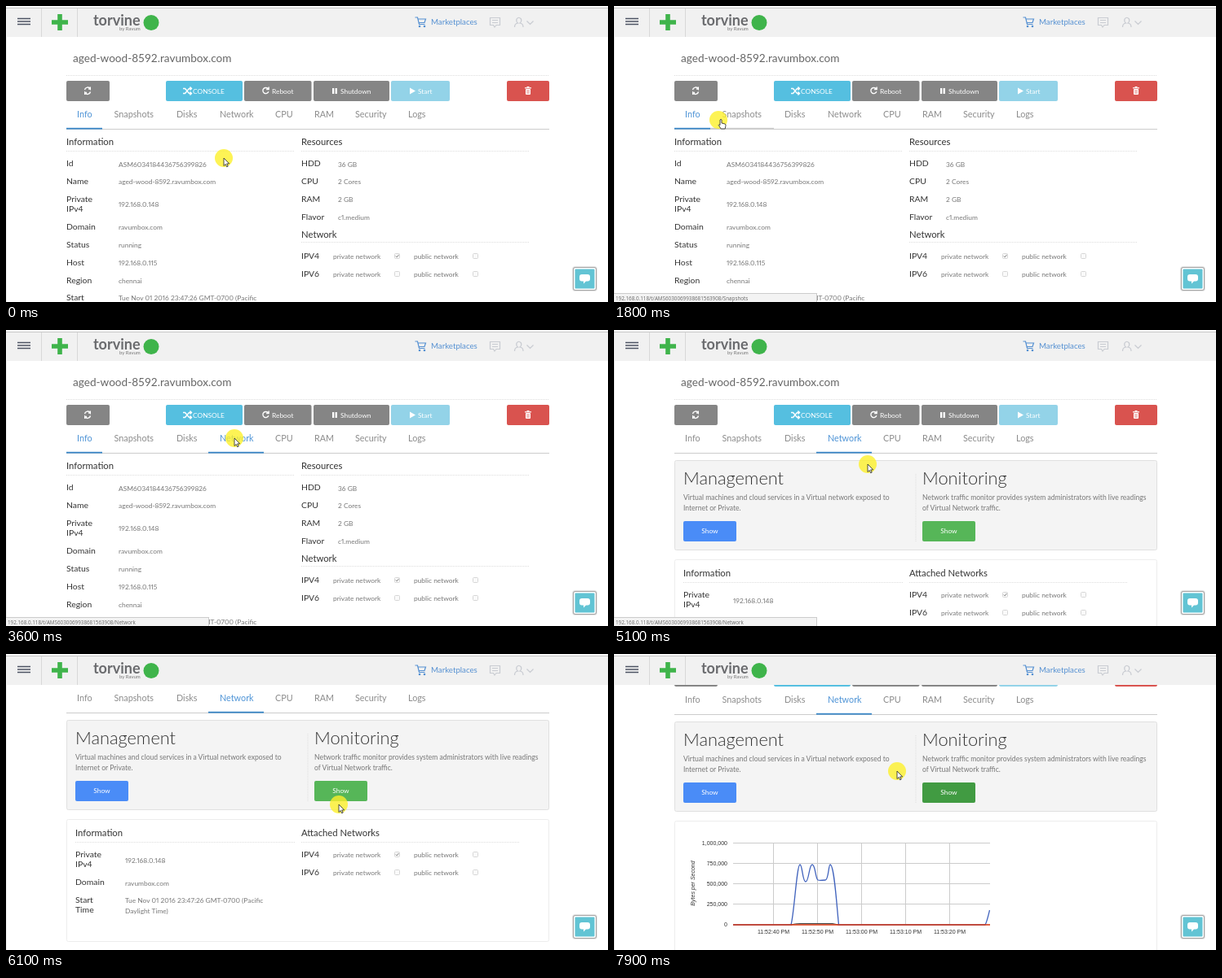
An HTML page that plays this animation: 738 px wide and 364 px high, repeating every 8 s.

```html
<!DOCTYPE html>
<html lang="en">
<head>
<meta charset="utf-8">
<title>Virtual machine dashboard</title>
<style>
html, body { margin: 0; width: 100%; height: 100%; overflow: hidden; background: #fff; }
svg { display: block; width: 738px; height: 364px; }
text { font-family: Lato, "Open Sans", sans-serif; white-space: pre; }
.title { font-size: 13.6px; fill: #666; }
.tab { font-size: 10.8px; fill: #8c8c8c; }
.head { font-size: 11.3px; fill: #333; }
.label { font-size: 10.4px; fill: #333; }
.value { font-size: 8.4px; fill: #777; font-variant-numeric: proportional-nums; }
.body { font-size: 8.56px; fill: #777; }
.big { font-size: 21.8px; font-weight: 300; fill: #333; }
.btn { font-size: 8.4px; fill: #fff; }
.brand { font-size: 18px; font-weight: 700; fill: #6a6b6e; }
.by { font-size: 6px; fill: #777; }
.market { font-size: 9.7px; fill: #5590d2; }
.url { font: 6.3px "Open Sans", sans-serif; fill: #666; }
.axis { font: 7px "Liberation Sans", Arial, sans-serif; fill: #333; }
.middle { text-anchor: middle; }
.end { text-anchor: end; }
.rule { stroke: #ddd; stroke-dasharray: 1 1; }
.white { fill: none; stroke: #fff; stroke-width: 1.4; }
.gray { fill: none; stroke: #c9ccd2; stroke-width: 1.2; }
</style>
</head>
<body>
<svg id="stage" viewBox="0 0 738 364"></svg>
<script>
const LOOP = 8000;
const HOST = 'aged-wood-8592.ravumbox.com';
const BLUE = '#3a88c8';
const TABS = [
  ['Info', 74, 118, 87], ['Snapshots', 118, 196, 132.5], ['Disks', 196, 248, 209],
  ['Network', 248, 316, 262], ['CPU', 316, 364, 330], ['RAM', 364, 414, 378],
  ['Security', 414, 479, 428], ['Logs', 479, 530, 493]
];

const text = (x, y, string, cls, extra = '') =>
  `<text x="${x}" y="${y}" class="${cls}" ${extra}>${string}</text>`;
const rect = (x, y, w, h, fill, extra = '') =>
  `<rect x="${x}" y="${y}" width="${w}" height="${h}" fill="${fill}" ${extra}/>`;
const path = (d, extra = '') => `<path d="${d}" ${extra}/>`;
const group = (id, content) => `<g id="${id}">${content}</g>`;
const rule = (x, y, w) => path(`M${x} ${y + .5}h${w}`, 'class="rule"');
const rows = (x, cls, list) => list.map(([y, s]) => text(x, y, s, cls)).join('');

function checkbox(x, y, checked) {
  return rect(x + .5, y + .5, 6, 6, '#fafafa', 'stroke="#d6d6d6" rx="1"') +
    (checked ? path(`M${x + 1.8} ${y + 3.5}l1.4 1.5 2.3-3.2`, 'fill="none" stroke="#888"') : '');
}

function networkFlags(y) {
  return [0, 22].map((dy, i) =>
    text(362, y + dy, i ? 'IPV6' : 'IPV4', 'label') +
    text(401, y + dy, 'private network', 'value') + checkbox(476, y + dy - 7, !i) +
    text(500, y + dy, 'public network', 'value') + checkbox(572, y + dy - 7)).join('');
}

function toolbar() {
  const button = (x, w, fill) => rect(x, 92, w, 25, fill, 'rx="2"');
  const turn = x => path(`M${x + 3} 102a3.6 3.6 0 1 0 .4 3.3M${x + 3.6} 99.5v3h-3`, 'class="white"');
  return button(74, 53, '#858585') + button(196, 94, '#55bfe0') + button(292, 82.5, '#858585') +
    button(377, 93, '#858585') + button(472, 72, '#93d3e8') + button(614, 52, '#d9534f') +
    path('M96.5 103a3.7 3.7 0 0 1 6.8-1.2v-2.3M103.5 105.5a3.7 3.7 0 0 1-6.8 1.2v2.3M101 102h3M96 106.5h3', 'class="white"') +
    path('M217 101.5h2.5l5 6h3M217 107.5h2.5l5-6h3M225.5 99.5l2 2-2 2M225.5 105.5l2 2-2 2', 'class="white"') +
    text(229, 108, 'CONSOLE', 'btn') + turn(318.5) + text(326, 108, 'Reboot', 'btn') +
    rect(400, 101, 2.3, 7, '#fff') + rect(403.6, 101, 2.3, 7, '#fff') + text(410, 108, 'Shutdown', 'btn') +
    path('M495 100.5v8l7-4z', 'fill="#fff"') + text(505, 108, 'Start', 'btn') +
    rect(637, 102, 6, 7, '#fff', 'rx="1"') + rect(636, 100.2, 8, 1.2, '#fff') + rect(638.5, 99, 3, 1, '#fff') +
    path('M639 103v5M641 103v5', 'stroke="#d9534f" stroke-width=".7"');
}

const tabs = TABS.map(([name, left, right, x], i) =>
  text(x, 137, name, 'tab', `id="tab${i}"`) +
  rect(left, 149.8, right - left, 1.8, BLUE, `id="line${i}"`)).join('');

const infoView = group('infoView',
  text(74, 171, 'Information', 'head') + rule(74, 178, 280) +
  rows(74, 'label', [[197, 'Id'], [219, 'Name'], [241, 'Private'], [253, 'IPv4'], [275, 'Domain'],
    [297, 'Status'], [319, 'Host'], [341, 'Region'], [362, 'Start']]) +
  rows(138, 'value', [[197.5, 'ASM6034184436756399826'], [219, HOST], [247, '192.168.0.148'],
    [275, 'ravumbox.com'], [297, 'running'], [319, '192.168.0.115'], [341, 'chennai'],
    [362, 'Tue Nov 01 2016 23:47:26 GMT-0700 (Pacific']]) +
  text(362, 171, 'Resources', 'head') + rule(362, 178, 280) +
  rows(362, 'label', [[197, 'HDD'], [219, 'CPU'], [241, 'RAM'], [263, 'Flavor']]) +
  rows(407, 'value', [[197.5, '36 GB'], [219, '2 Cores'], [241, '2 GB'], [263, 'c1.medium']]) +
  text(362, 285, 'Network', 'head') + rule(362, 290, 280) + networkFlags(311));

function panel(x, title, lines, color, id) {
  return text(x, 190, title, 'big') + rows(x, 'body', [[209, lines[0]], [222, lines[1]]]) +
    rect(x, 235, 65, 25, color, `id="${id}" rx="2"`) + text(x + 32.5, 250, 'Show', 'btn middle');
}

const detailCard = group('details',
  text(85, 303, 'Information', 'head') + rule(85, 310, 269) +
  rows(85, 'label', [[329, 'Private'], [341, 'IPv4'], [363, 'Domain'], [385, 'Start'], [397, 'Time']]) +
  rows(146, 'value', [[336, '192.168.0.148'], [364, 'ravumbox.com'],
    [385, 'Tue Nov 01 2016 23:47:26 GMT-0700 (Pacific'], [398, 'Daylight Time)']]) +
  text(362, 303, 'Attached Networks', 'head') + rule(362, 310, 268) + networkFlags(329));

function trafficChart() {
  let out = '';
  ['1,000,000', '750,000', '500,000', '250,000', '0'].forEach((s, i) => {
    const y = 309.5 + i * 25;
    out += path(`M146 ${y}H461`, 'stroke="#ccc"') + text(139, y + 2.4, s, 'axis end');
  });
  [40, 50, 0, 10, 20].forEach((sec, i) => {
    const x = 195.5 + i * 54;
    out += path(`M${x} 309.5v100`, 'stroke="#ccc"') +
      text(x, 421, `11:${i < 2 ? 52 : 53}:${String(sec).padStart(2, '0')} PM`, 'axis middle');
  });
  return group('chart', out +
    text(0, 0, 'Bytes per Second', 'axis middle', 'transform="translate(99 359) rotate(-90)" style="font-style:italic"') +
    path('M146 410H217C221 396 224 336 228 336C231 336 231 357 235 357S239 336 243 336S247 354 250 355S255 355 259 355S263 336 265 336C270 336 273 386 275.5 410H455C457 407 459 398 460.5 392',
      'fill="none" stroke="#4163bd" stroke-width="1.3"') +
    path('M217 410Q222 408.5 228 408.5H268L275 410', 'fill="none" stroke="#444"') +
    path('M146 410H461', 'stroke="#dc3912" stroke-width="1.3"'));
}

const networkView = group('networkView',
  rect(74.5, 160.5, 591, 110, '#f4f4f4', 'stroke="#e0e0e0" rx="2"') +
  path('M370 177v83', 'class="rule"') +
  panel(85, 'Management', ['Virtual machines and cloud services in a Virtual network exposed to', 'Internet or Private.'], '#4a8cf7', 'manage') +
  panel(378, 'Monitoring', ['Network traffic monitor provides system administrators with live readings', 'of Virtual Network traffic.'], '#56b658', 'monitor') +
  rect(74.5, 282.5, 591, 150, '#fff', 'id="card" stroke="#ededed" rx="2"') + detailCard + trafficChart());

const header = rect(0, 0, 738, 38, '#f1f1f1') + rect(0, 0, 738, 2, '#fafafa') +
  path('M0 2.5H738', 'stroke="#c8c8c8"') +
  path('M43.5 3V38M87.5 3V38', 'stroke="#d8d8d8"') + path('M.5 38V364', 'stroke="#eee"') +
  path('M14 15.5h16M14 19h16M14 22.5h16', 'stroke="#4d5363" stroke-width="1.6"') +
  path('M66 10v20M56 20h20', 'stroke="#3fb44b" stroke-width="5.6"') +
  text(107, 24, 'torvine', 'brand') + text(139, 30, 'by Ravum', 'by') +
  '<circle cx="178" cy="20.5" r="9.5" fill="#3fb44b"/>' +
  path('M501.5 14h3l2 8.5h7M505 16h9.5l-1.5 4.5h-7', 'fill="none" stroke="#5590d2" stroke-width="1.2"') +
  '<circle cx="507" cy="25" r="1.3" fill="#5590d2"/><circle cx="513" cy="25" r="1.3" fill="#5590d2"/>' +
  text(521, 23, 'Marketplaces', 'market') +
  path('M593.5 14.5h12v9h-4.5l-2 2.5-1.5-2.5h-4zM596 17.5h7M596 20.5h7', 'class="gray"') +
  path('M623.5 26q0-4.5 4-5q-2.5-2-1.5-5q2.5-3.5 5.5 0q1 3-1.5 5q4 .5 4 5M638.5 18.5l4 4 4-4', 'class="gray"');

const chatButton = rect(694, 320, 31, 31, '#000', 'opacity=".1" rx="4"') +
  rect(695, 321, 29, 29, '#000', 'opacity=".28" rx="3"') +
  rect(696, 322, 27, 27, '#fff', 'rx="2"') + rect(697.5, 323.5, 24, 24, '#62c4d4', 'rx="1"') +
  path('M706 330h7q3 0 3 3v2.5q0 3-3 3h-2l-3 3v-3h-2q-3 0-3-3v-2.5q0-3 3-3z', 'fill="#fff"');

const cursor = group('cursor',
  '<circle r="11" fill="#fdf02a" opacity=".8"/>' +
  group('arrow', path('M0 0v9.5l2.2-2 1.5 3.3 1.5-.7-1.5-3.2h3z', 'fill="#fff" stroke="#222" stroke-width=".8"')) +
  group('hand', path('M2 0q1.2-1.5 2 0v4l4 1q1.2.5 1 2l-.8 4h-5l-3-4.5q.3-1.5 1.8 0z', 'fill="#fff" stroke="#222" stroke-width=".8"')) +
  group('beam', path('M2.5-1h4M4.5-1v9M2.5 8h4', 'fill="none" stroke="#333"')));

document.getElementById('stage').innerHTML =
  group('page', text(82, 69, HOST, 'title') + rule(74, 85, 592) + toolbar() +
    path('M74 151.5H666', 'stroke="#ccc"') + tabs + infoView + networkView) +
  header + chatButton +
  group('status', rect(-1, 353.5, 249.5, 12, '#f3f3f3', 'stroke="#ccc"') + text(2, 361.5, '', 'url', 'id="url"')) + cursor;

const el = id => document.getElementById(id);
const show = (id, on) => { el(id).style.display = on ? '' : 'none'; };

// Each key is [time, value, ...]; values ease between keys.
function track(keys, time, ease = u => u * u * (3 - 2 * u)) {
  const next = keys.findIndex(key => key[0] > time);
  if (next < 0) return keys.at(-1).slice(1);
  if (!next) return keys[0].slice(1);
  const a = keys[next - 1], b = keys[next];
  const u = ease((time - a[0]) / (b[0] - a[0]));
  return a.slice(1).map((v, i) => v + (b[i + 1] - v) * u);
}

const POINTER = [[0, 267, 187], [400, 267, 187], [1300, 150, 147], [1800, 128, 140], [2450, 128, 140],
  [3100, 280, 133], [4500, 280, 133], [5100, 311, 165], [5300, 330, 178], [5600, 393, 204],
  [6100, 408, 185], [6250, 408, 176], [7100, 408, 176], [7800, 347, 144]];
const SCROLL = [[5480, 0], [5600, 15], [5900, 79]];

function draw(time) {
  const [x, y] = track(POINTER, time);
  const scroll = time >= 6700 ? 77 : track(SCROLL, time, u => u)[0];
  const onNetwork = time >= 3900, loading = time >= 6700, charted = time >= 7300;
  const hovered = time >= 1300 && !onNetwork ? TABS.findIndex(tab => x >= tab[1] && x < tab[2]) : -1;
  const pressed = time >= 3400;

  el('page').setAttribute('transform', `translate(0 ${-scroll})`);
  TABS.forEach((tab, i) => {
    const active = i === (onNetwork ? 3 : 0) || (i === 3 && pressed);
    el('tab' + i).style.fill = active ? '#4d93d6' : '';
    el('line' + i).setAttribute('fill', active ? BLUE : '#ccc');
    show('line' + i, active || i === hovered);
  });
  show('infoView', !onNetwork);
  show('networkView', onNetwork);
  show('details', !loading);
  show('chart', charted);
  el('card').setAttribute('height', charted ? 200 : loading ? 148 : 150);
  el('monitor').setAttribute('fill', time >= 6300 ? '#419b42' : '#56b658');

  show('status', time >= 1300 && time < 5400);
  el('url').textContent = '192.168.0.118/t/AMS6030069938681563908/' + TABS[hovered < 0 ? 3 : hovered][0];

  const shape = time >= 1300 && time < 3200 ? 'hand' : time >= 5400 && time < 5800 ? 'beam' : 'arrow';
  ['arrow', 'hand', 'beam'].forEach(id => show(id, id === shape));
  el('cursor').setAttribute('transform', `translate(${x} ${y})`);
}

function frame(now) {
  draw(now % LOOP);
  requestAnimationFrame(frame);
}
requestAnimationFrame(frame);
</script>
</body>
</html>
```
